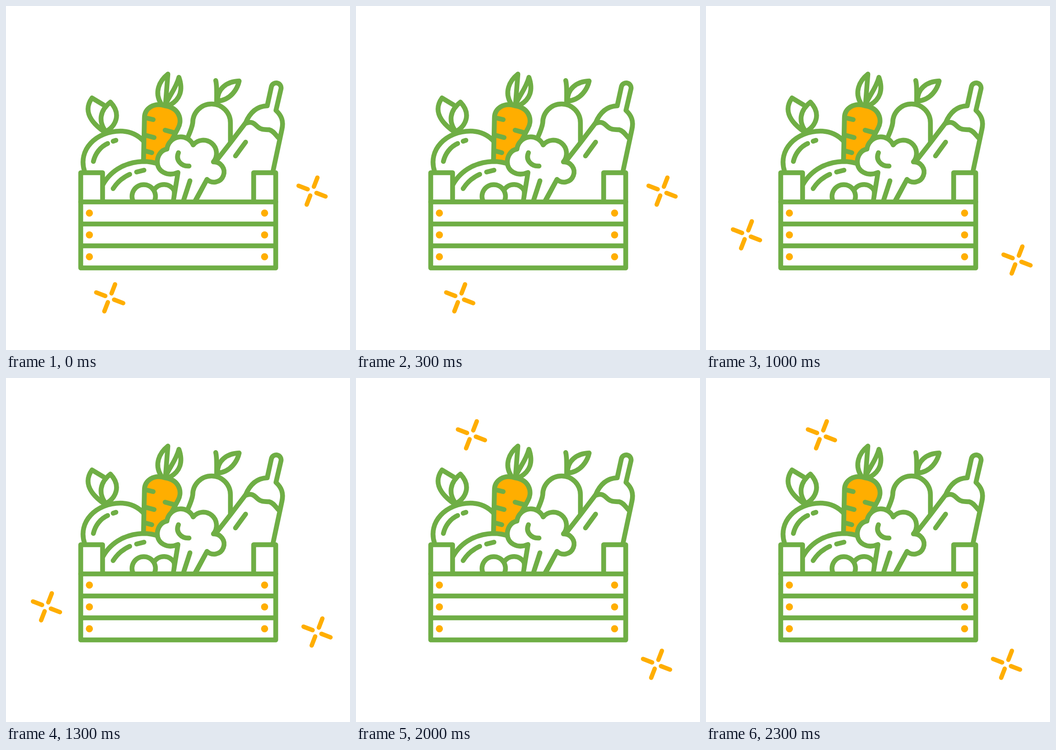
Write an HTML page that moves like this. It is 748 px wide and 748 px high and loops after 2500 ms.

```html
<!DOCTYPE html>
<html lang="en">
<head>
<meta charset="utf-8">
<title>Vegetable crate</title>
<style>
  html, body { margin: 0; width: 100%; height: 100%; overflow: hidden; background: #fff; }
  svg { display: block; width: 100vw; height: 100vh; }
  .lines { fill: #fff; stroke: #6fae45; stroke-width: 10.5; stroke-linecap: round; stroke-linejoin: round; }
  .open { fill: none; }
  .orange { fill: #ffae00; }
  .spark { fill: none; stroke: #ffae00; stroke-width: 9.5; stroke-linecap: round; }
</style>
</head>
<body>
<svg viewBox="0 0 748 748">
  <defs>
    <path id="ray" d="M11.6 -29.3L4 -9.6"/>
    <g id="spark" class="spark">
      <use href="#ray"/>
      <use href="#ray" transform="rotate(90)"/>
      <use href="#ray" transform="rotate(180)"/>
      <use href="#ray" transform="rotate(270)"/>
    </g>
  </defs>

  <g class="lines">
    <g id="fruit">
      <path d="M212 215L187 200C171 222 176 247 213 273"/>
      <path d="M227 209C203 228 201 252 217 273C238 262 252 235 227 209Z"/>
      <path d="M171 360C155 313 196 272 249 272C270 272 289 281 301 296V360"/>
      <path class="open" d="M190 338C194 321 205 306 221 299M233 294L239 292"/>
    </g>

    <g id="carrot">
      <path d="M337 212C322 188 333 163 352 148L347 212"/>
      <path d="M348 212C356 194 370 178 376 155C386 183 378 203 357 215"/>
      <path class="orange" d="M299 336L301 244C301 222 322 209 346 217C375 221 385 246 374 266L350 311L335 340"/>
      <path class="open" d="M303 243L320 247M346 270L368 276M303 281L322 286M302 315L317 319"/>
    </g>

    <g id="pear">
      <path d="M396 284C402 270 405 262 406 254A41 41 0 0 1 488 254V310"/>
      <path d="M460 207C459 180 480 164 507 163C503 181 489 204 460 207Z"/>
      <path class="open" d="M456 162C459 172 458 190 458 210"/>
    </g>

    <g id="eggplant">
      <path d="M411 426L460 333L489 296L521 254C529 235 543 218 568 217L577 176A10.5 10.5 0 0 1 598 180L587 227C599 238 604 250 600 268L580 362V426"/>
      <path class="open" d="M521 255C537 249 541 258 549 264C557 270 563 268 572 269C582 271 586 281 595 289M521 296L499 326"/>
    </g>

    <g id="cabbage">
      <path d="M211 388C230 354 265 339 298 338C312 338 322 340 333 344L374 364L364 426H211"/>
      <path class="open" d="M233 397C242 383 253 373 269 366M284 361L300 357"/>
      <path d="M322 400A25.5 25.5 0 0 1 366 402V426H322"/>
      <path d="M277 426A25.5 25.5 0 1 1 322 426"/>
    </g>

    <g id="broccoli">
      <path d="M363.5 426L374 362C350 372 329 359 329 339C329 325 338 313 350 311A30 30 0 0 1 407 302A28.5 28.5 0 0 1 451 339A22 22 0 1 1 437 377L410 426"/>
      <path class="open" d="M375 319C368 335 381 349 398 348M400 380L385 426"/>
    </g>

    <g id="crate">
      <path d="M162.5 426V362.5H210V426M538.5 426V362.5H586.5V426"/>
      <path d="M162.5 426H586.5V569.5H162.5ZM162.5 474H586.5M162.5 521.5H586.5"/>
    </g>
  </g>

  <g id="nails" class="orange"></g>
  <use class="twinkle" href="#spark"/>
  <use class="twinkle" href="#spark"/>
</svg>

<script>
const STEP = 500;
const poses = [
  [[225.5, 634.5], [665.5, 402.5]],
  [[102, 242], [570, 94.5]],
  [[88, 497.5], [676.3, 552.3]],
  [[245.5, 642], [665, 334]],
  [[251, 123.5], [653.5, 622.5]]
];
const twinkles = document.querySelectorAll('.twinkle');

document.getElementById('nails').innerHTML = [450.3, 497.7, 545.2].flatMap(y =>
  [181.3, 562.3].map(x => `<circle cx="${x}" cy="${y}" r="7.7"/>`)).join('');

function draw(time) {
  const pose = poses[Math.floor(time / STEP) % poses.length];
  twinkles.forEach((el, i) => el.setAttribute('transform', `translate(${pose[i]})`));
}

function tick() {
  draw(performance.now());
  requestAnimationFrame(tick);
}
tick();
</script>
</body>
</html>
```
